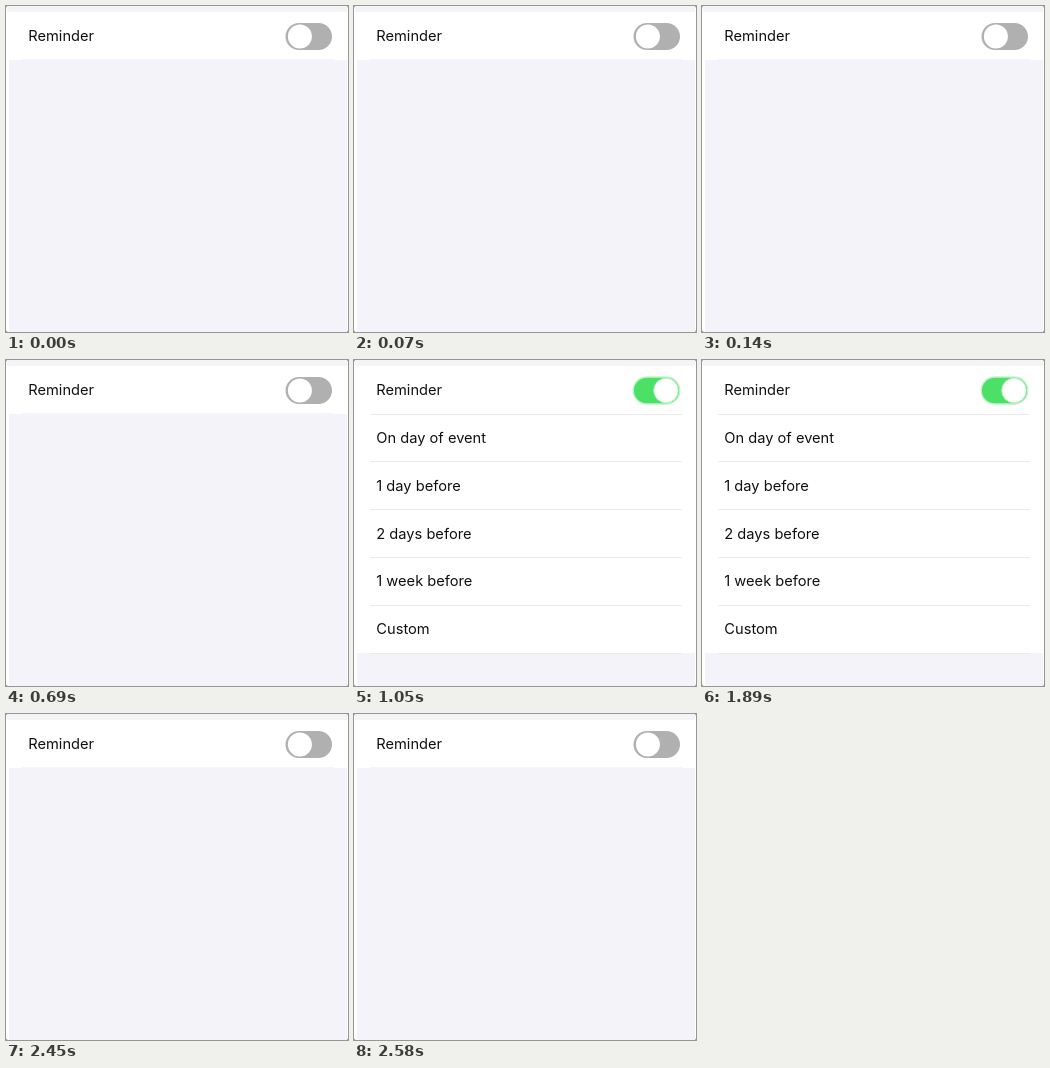
Write an HTML page that moves like this. It is 342 px wide and 326 px high and loops after 2.66 s.

```html
<!DOCTYPE html>
<html lang="en">
<head>
<meta charset="utf-8">
<title>Reminder switch</title>
<style>
  html, body { margin: 0; width: 100%; height: 100%; overflow: hidden; background: #fff; }
  svg { display: block; }
  text { font: 14.65px Inter, Roboto, sans-serif; fill: #111; }
</style>
</head>
<body>
<svg width="342" height="326" viewBox="0 0 342 326">
  <path fill="#777" d="M0 0h342v326H0z"/>
  <rect width="342" height="326" rx="2" fill="#fff"/>
  <path fill="#f4f4f7" d="M1 0h340v6H1z"/>
  <path fill="#f4f3fa" d="M3 54h338v272H3z"/>
  <text x="22.3" y="35.2">Reminder</text>
  <g id="off">
    <path fill="#f5f5f7" d="M16 53h312v1H16z"/>
    <rect x="279.5" y="17" width="46.5" height="27" rx="13.5" fill="#b0b0b0"/>
    <circle cx="293.9" cy="30.6" r="12" fill="#fff"/>
  </g>
  <g id="on">
    <path fill="#fff" d="M0 54h342v239H0z"/>
    <g id="rows"></g>
    <rect x="279.2" y="17" width="46.6" height="27" rx="13.5" fill="#4be066" stroke="#c4f3cc" stroke-width="1.4"/>
    <circle cx="312" cy="30.5" r="12.2" fill="#fff" stroke="#c4f3cc"/>
  </g>
</svg>
<script>
const LOOP = 2660, OPEN = 1050, CLOSE = 2450, ROW = 47.8;
const $ = id => document.getElementById(id);
const options = ['On day of event', '1 day before', '2 days before', '1 week before', 'Custom'];

$('rows').innerHTML = ['', ...options].map((label, i) =>
  `<text x="22.3" y="${35.2 + ROW * i}">${label}</text>
   <path fill="#ebebed" d="M16 ${Math.floor(54 + ROW * i)}h312v1H16z"/>`).join('');

function draw(now) {
  const t = now % LOOP;
  const open = t >= OPEN && t < CLOSE;
  $('on').style.display = open ? '' : 'none';
  $('off').style.display = open ? 'none' : '';
  requestAnimationFrame(draw);
}
draw(performance.now());
</script>
</body>
</html>
```
